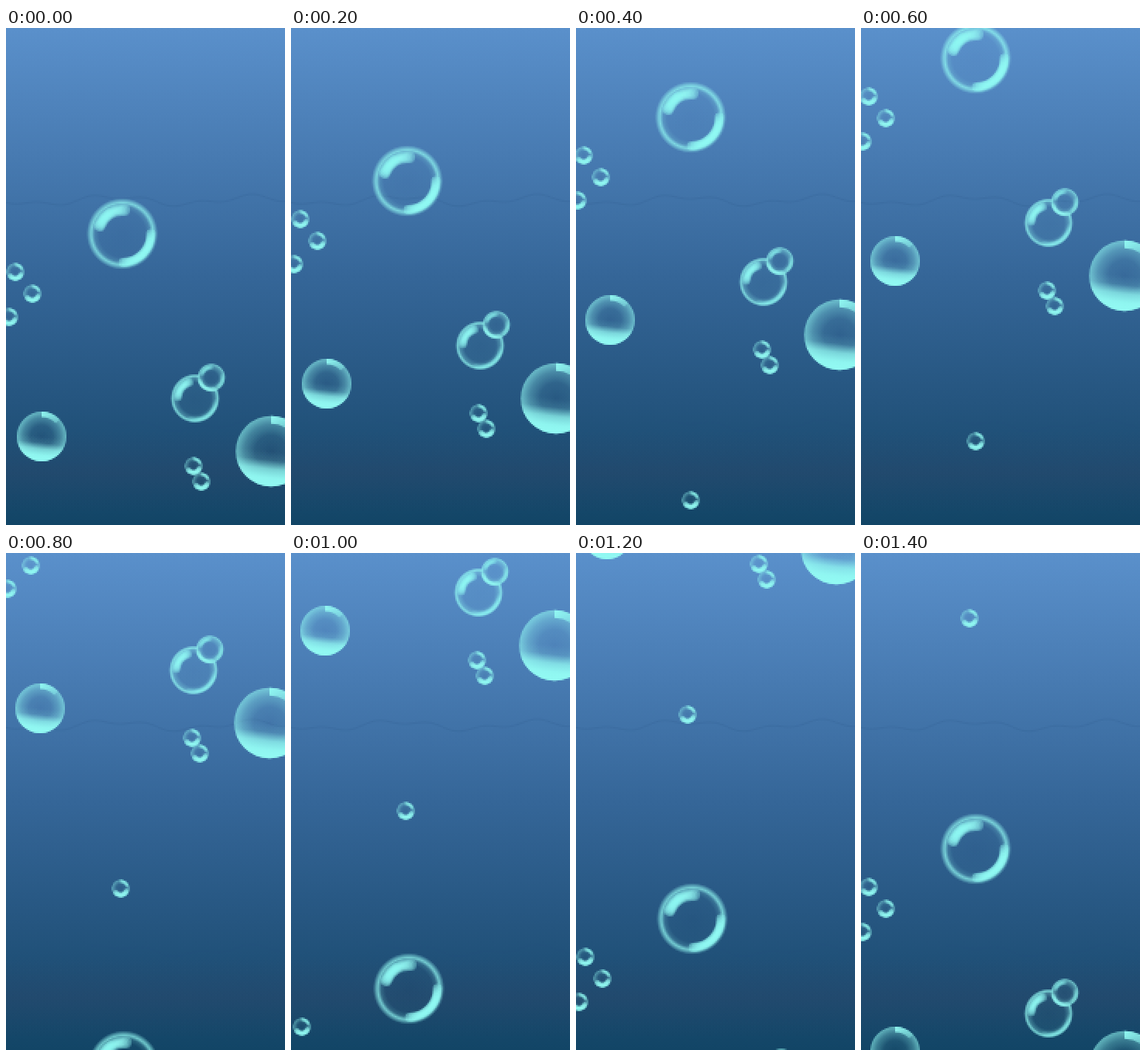
Animation of 360 by 640 pixels, one loop 1.6 s. Source, as an HTML page with a canvas:

```html
<!DOCTYPE html>
<html lang="en">
<head>
<meta charset="utf-8">
<title>Rising bubbles</title>
<style>
  html, body { margin: 0; width: 100%; height: 100%; overflow: hidden; background: #2f6093; }
  canvas { display: block; width: 360px; height: 640px; image-rendering: pixelated; }
</style>
</head>
<body>
<canvas id="sea" width="180" height="320"></canvas>
<script>
const STEP = 200, COUNT = 8;
const TAU = Math.PI * 2;
const ctx = document.getElementById('sea').getContext('2d');
ctx.scale(0.5, 0.5);

// Key points [step, dx, dy] of the leaving and the arriving swarm.
const paths = [
  [[0, 0, 0], [1, 0, -68], [2, -2, -150], [3, -2, -226], [5, -2, -426], [7, -10, -674]],
  [[4, 2, 396], [5, 2, 296], [7, -2, 116]]
];

const swarm = [
  [halo, 150, 265, 42],
  [pair, 244, 477, 30],
  [glass, 46, 526, 32],
  [glass, 342, 545, 45.5],
  [bead, 12, 314],
  [bead, 34, 342],
  [bead, 4, 372],
  [bead, 242, 564],
  [bead, 252, 584],
  [bead, 150, 758]
];

const glow = a => `rgba(146,250,243,${a})`;
const even = v => 2 * Math.round(v / 2);

function along(path, step) {
  if (step < path[0][0]) return null;
  const n = path.findIndex(p => p[0] >= step);
  const b = path[n], a = path[Math.max(0, n - 1)];
  const t = (step - a[0]) / (b[0] - a[0] || 1);
  return [1, 2].map(k => even(a[k] + (b[k] - a[k]) * t));
}

function disc(x, y, r, fill) {
  ctx.fillStyle = fill;
  ctx.beginPath();
  ctx.arc(x, y, r, 0, TAU);
  ctx.fill();
}

// Radial shading; stops are [radius share, alpha].
function shade(x, y, r, stops) {
  const end = stops[stops.length - 1][0];
  const g = ctx.createRadialGradient(x, y, 0, x, y, r * end);
  for (const [p, a] of stops) g.addColorStop(p / end, glow(a));
  disc(x, y, r * end, g);
}

// Arc that fades to its sides and ends; angles in degrees.
function softArc(x, y, r, from, to, width, alpha) {
  const layers = 7, inset = (to - from) * 0.35;
  ctx.lineCap = 'round';
  ctx.strokeStyle = glow(1 - Math.pow(1 - alpha, 1.6 / layers));
  for (let i = 0; i < layers; i++) {
    const k = i / layers;
    ctx.lineWidth = width * (1 - k);
    ctx.beginPath();
    ctx.arc(x, y, r, (from + inset * k) * TAU / 360, (to - inset * k) * TAU / 360);
    ctx.stroke();
  }
}

function halo(x, y, r) {
  shade(x, y, r, [[0, 0], [0.72, 0.02], [0.85, 0.16], [0.95, 0.72], [1, 0.5], [1.1, 0]]);
  softArc(x, y, r * 0.73, 200, 275, 15, 0.85);
  softArc(x, y, r * 0.73, 200, 238, 14, 0.6);
  softArc(x, y, r * 0.88, 0, 88, 12, 0.93);
}

function pair(x, y, r) {
  const sx = x + 21, sy = y - 27, sr = 18;
  ctx.save();
  ctx.beginPath();
  ctx.rect(x - 40, y - 40, 80, 80);
  ctx.arc(sx, sy, sr - 2, 0, TAU);
  ctx.clip('evenodd');
  shade(x, y, r, [[0, 0.03], [0.68, 0.05], [0.87, 0.3], [0.95, 0.75], [1, 0.55], [1.06, 0]]);
  softArc(x, y, r * 0.74, 185, 250, 11, 0.85);
  softArc(x, y, r * 0.9, 10, 105, 6, 0.5);
  ctx.restore();
  shade(sx, sy, sr, [[0, 0.03], [0.45, 0.06], [0.75, 0.34], [0.92, 0.62], [1.04, 0]]);
  softArc(sx, sy, sr * 0.86, 75, 165, 6, 0.8);
  softArc(sx, sy, sr * 0.8, -10, 60, 6, 0.5);
  softArc(sx, sy, sr * 0.72, 200, 270, 6, 0.6);
}

function glass(x, y, r) {
  shade(x, y, r, [[0, 0.02], [0.45, 0.08], [0.75, 0.3], [1, 0.62]]);
  const pool = ctx.createLinearGradient(x, y, x - r * 0.12, y + r);
  [0, 0.1, 0.72, 0.95, 1].forEach((a, i) => pool.addColorStop(i / 4, glow(a)));
  disc(x, y, r, pool);
  const a = -TAU / 4, b = -0.12 * TAU;
  const shine = ctx.createLinearGradient(x, y - r, x + r * 0.75, y - r * 0.55);
  shine.addColorStop(0, glow(0.95));
  shine.addColorStop(1, glow(0.3));
  ctx.fillStyle = shine;
  ctx.beginPath();
  ctx.arc(x, y, r, a, b);
  ctx.arc(x, y, r * 0.78, b, a, true);
  ctx.fill();
}

function bead(x, y, r = 11.5) {
  if (y + r > 640) return;
  shade(x, y, r, [[0, 0.02], [0.5, 0.08], [0.8, 0.32], [0.95, 0.42], [1.06, 0]]);
  softArc(x, y, r * 0.72, 25, 140, 7, 0.9);
  softArc(x, y, r * 0.8, 275, 335, 5, 0.7);
}

function water() {
  const g = ctx.createLinearGradient(0, 0, 0, 640);
  ['#5a90cb', '#487bb2', '#356698', '#25557f', '#124566']
    .forEach((c, i) => g.addColorStop(i / 4, c));
  ctx.fillStyle = g;
  ctx.fillRect(0, 0, 360, 640);

  // Dull layer near the sea floor
  const dull = ctx.createLinearGradient(0, 520, 0, 625);
  [0, 0.16, 0].forEach((a, i) => dull.addColorStop(i / 2, `rgba(72,62,96,${a})`));
  ctx.fillStyle = dull;
  ctx.fillRect(0, 520, 360, 105);

  // Faint ripple edges
  ctx.lineWidth = 2;
  ctx.strokeStyle = 'rgba(35,80,130,.14)';
  for (const [y, from] of [[222, 0], [512, 110]]) {
    ctx.beginPath();
    for (let x = from; x <= 360; x += 4)
      ctx.lineTo(x, y + 5 * Math.sin(x / 29) + 3 * Math.sin(x / 11 + 1));
    ctx.stroke();
  }
}

function render(step) {
  water();
  for (const path of paths) {
    const at = along(path, step);
    if (at) for (const [draw, x, y, r] of swarm) draw(x + at[0], y + at[1], r);
  }
}

let shown = -1;
const start = performance.now();

function tick(now) {
  const step = Math.floor(Math.max(0, now - start) / STEP) % COUNT;
  if (step !== shown) render(shown = step);
  requestAnimationFrame(tick);
}
tick(start);
</script>
</body>
</html>
```
